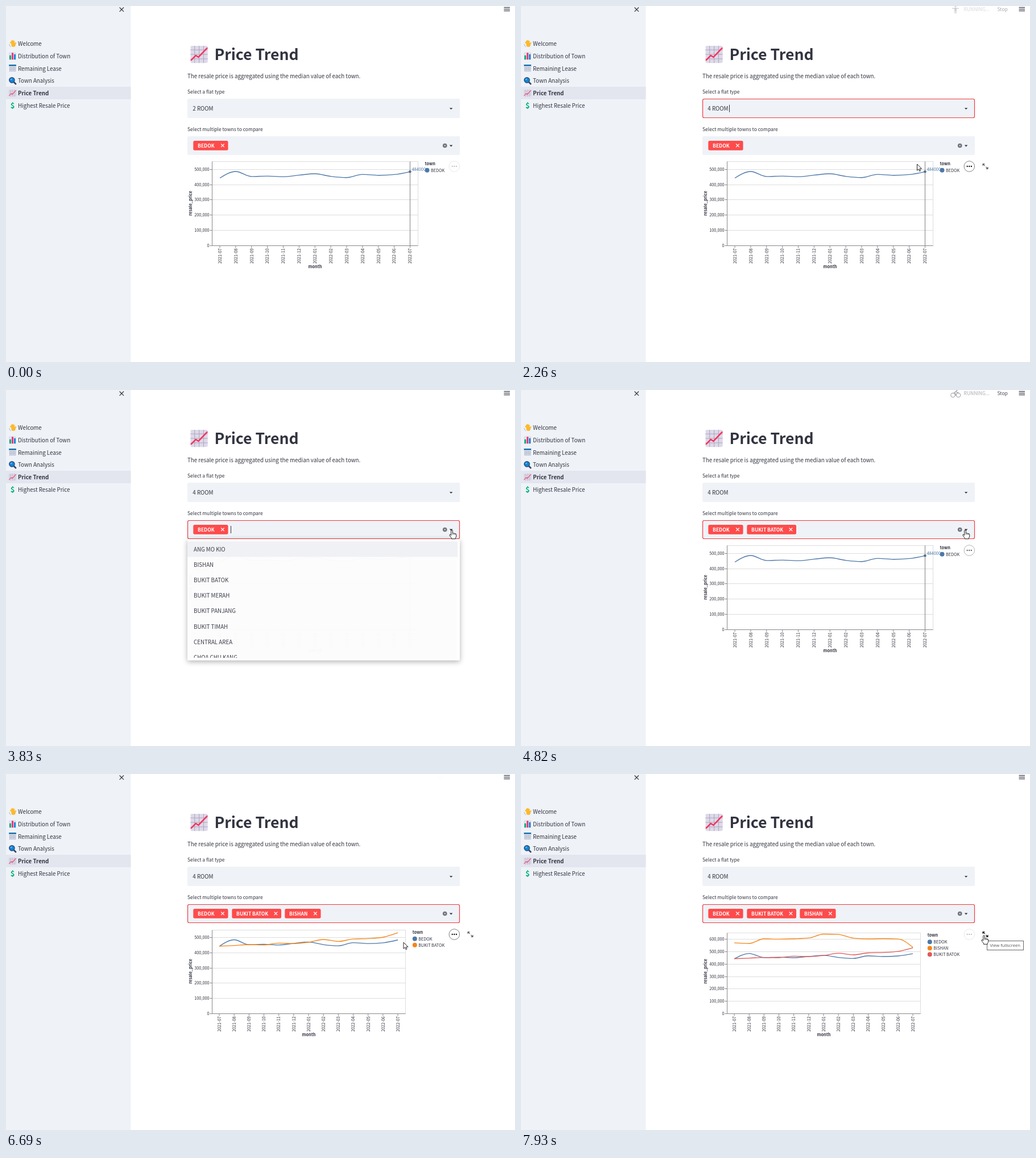
An HTML page with a canvas that plays this animation: 895x626 px, repeating every 8000 ms.

```html
<!DOCTYPE html>
<html lang="en">
<head>
<meta charset="utf-8">
<title>Price Trend</title>
<style>
html, body { margin: 0; width: 100%; height: 100%; overflow: hidden; background: #fff; }
canvas { display: block; width: 895px; height: 626px; }
</style>
</head>
<body>
<canvas id="stage"></canvas>
<script>
const W = 895, H = 626, LOOP = 8000;
const canvas = document.getElementById('stage');
const ctx = canvas.getContext('2d');
const dpr = window.devicePixelRatio || 1;
canvas.width = W * dpr;
canvas.height = H * dpr;

const SANS = '"Noto Sans CJK SC", "Noto Sans CJK JP", "Noto Sans CJK TC", "Noto Sans", sans-serif';
const INK = '#31333f', PANEL = '#eff2f7', RED = '#ff4b4b';
const BODY = 9.74, SMALL = 8.5, TINY = 7.28;

// ---------- helpers ----------
const clamp = v => Math.max(0, Math.min(1, v));
const ease = v => v * v * (3 - 2 * v);
const between = (t, a, b) => t >= a && t < b;
const fade = (t, a, b, rise, fall) => clamp((t - a) / rise) * (1 - clamp((t - b) / fall));

function text(str, x, y, size, color = INK, weight = 400, align = 'left') {
  ctx.font = `${weight} ${size}px ${SANS}`;
  ctx.fillStyle = color;
  ctx.textAlign = align;
  ctx.fillText(str, x, y);
}

function vertical(str, x, y, size, color, weight, align) {
  ctx.save();
  ctx.translate(x, y);
  ctx.rotate(-Math.PI / 2);
  text(str, 0, 0, size, color, weight, align);
  ctx.restore();
}

function rect(x, y, w, h, color, r = 0) {
  ctx.fillStyle = color;
  ctx.beginPath();
  ctx.roundRect(x, y, w, h, r);
  ctx.fill();
}

function line(pts, color, width = 1) {
  ctx.strokeStyle = color;
  ctx.lineWidth = width;
  ctx.beginPath();
  pts.forEach(([x, y]) => ctx.lineTo(x, y));
  ctx.stroke();
}

function dot(x, y, r, fill, stroke, width = 1) {
  ctx.beginPath();
  ctx.arc(x, y, r, 0, 7);
  if (fill) { ctx.fillStyle = fill; ctx.fill(); }
  if (stroke) { ctx.strokeStyle = stroke; ctx.lineWidth = width; ctx.stroke(); }
}

function cross(x, y, r, color, width) {
  line([[x - r, y - r], [x + r, y + r]], color, width);
  line([[x - r, y + r], [x + r, y - r]], color, width);
}

function at(x, y, scale, draw) {
  ctx.save();
  ctx.translate(x, y);
  ctx.scale(scale, scale);
  draw();
  ctx.restore();
}

function withAlpha(alpha, draw) {
  if (alpha <= 0) return;
  ctx.save();
  ctx.globalAlpha = alpha;
  draw();
  ctx.restore();
}

// ---------- small pictures, each in a box of about 13 px ----------
function waveIcon() {
  ctx.lineCap = 'round';
  [[3.2, 4.5], [4.8, 2.2], [7, 1.4], [9.3, 2.6]].forEach(([x, y]) =>
    line([[x, y], [8, 8.5]], '#fcb92c', 2.3));
  line([[11.8, 5.4], [10.2, 9]], '#fcb92c', 2.2);
  dot(8, 8.8, 3.7, '#fcb92c');
  line([[.8, 8], [1.6, 10.6], [3.4, 12.2]], '#8fa6b8', .8);
  ctx.lineCap = 'butt';
}

function barsIcon() {
  rect(0, 0, 13, 13, '#dfe1ec', 1.5);
  rect(1, 5.5, 3, 7.5, '#00a88a', .5);
  rect(5, 1, 3, 12, '#f4386c', .5);
  rect(9, 3.5, 3, 9.5, '#1687dc', .5);
}

function calendarIcon() {
  rect(0, 0, 13, 13, '#e4e7f2', 1.5);
  rect(0, 0, 13, 2.7, '#2277ad', 1);
  for (let i = 0; i < 12; i++) rect(1.6 + i % 4 * 2.8, 4.7 + (i >> 2) * 2.7, 1.4, 1.4, '#778299');
}

function lensIcon() {
  ctx.lineCap = 'round';
  line([[8.5, 8.5], [12, 12]], '#33486d', 2.8);
  ctx.lineCap = 'butt';
  dot(5.4, 5.4, 4.6, '#1683d5', '#24517f', 1.5);
  dot(4.2, 4, 1.3, '#62bbf2');
}

function trendIcon() {
  rect(0, 0, 13, 13, '#ded9e9', 1);
  [3.1, 6.5, 9.9].forEach(p => {
    line([[p, 0], [p, 13]], '#aaa4bb', .4);
    line([[0, p], [13, p]], '#aaa4bb', .4);
  });
  ctx.lineCap = ctx.lineJoin = 'round';
  line([[.5, 10.8], [4, 7.3], [6, 8.6], [12.5, 1.8]], '#f8315b', 1.05);
  ctx.lineCap = 'butt';
  ctx.lineJoin = 'miter';
}

function dollarIcon() { text('$', 6.5, 11.2, 13, '#00b37a', 700, 'center'); }

// ---------- static page ----------
const LINKS = [
  ['Welcome', waveIcon], ['Distribution of Town', barsIcon], ['Remaining Lease', calendarIcon],
  ['Town Analysis', lensIcon], ['Price Trend', trendIcon], ['Highest Resale Price', dollarIcon]
];

function page() {
  rect(0, 0, W, H, '#fff');
  rect(0, 0, 219.5, H, PANEL);
  rect(0, 142, 219.5, 22, '#e3e6ee');
  cross(203.3, 6.2, 3.7, INK, 1.2);
  LINKS.forEach(([name, icon], i) => {
    const y = 66 + i * 21.8;
    at(5, y - 6.5, 1, icon);
    text(name, 21, y + 4, BODY, INK, i === 4 ? 700 : 400);
  });
  [2.5, 5.5, 8.5].forEach(y => line([[875.5, y], [886, y]], INK, 1.2));
  at(324.5, 70, 2.32, trendIcon);
  text('Price Trend', 366.5, 95, 26.55, INK, 700);
  text('The resale price is aggregated using the median value of each town.', 319, 126.5, BODY);
  text('Select a flat type', 319, 153.6, SMALL);
  text('Select multiple towns to compare', 319, 219.6, SMALL);
}

function field(y, h, focused) {
  rect(319, y, 479, h, PANEL, 2.5);
  if (focused) {
    ctx.strokeStyle = '#f03a3e';
    ctx.lineWidth = 1.2;
    ctx.beginPath();
    ctx.roundRect(319.5, y + .5, 478, h - 1, 2.5);
    ctx.stroke();
  }
}

function chevron(x, y) {
  ctx.fillStyle = INK;
  ctx.beginPath();
  ctx.moveTo(x - 2.8, y - 1.3);
  ctx.lineTo(x + 2.8, y - 1.3);
  ctx.lineTo(x, y + 1.6);
  ctx.fill();
}

const caret = (x, y) => rect(x, y, 1, 13, INK);

const TAGS = [['BEDOK', 329.3, 61.2], ['BUKIT BATOK', 397.3, 86.7], ['BISHAN', 490.3, 63.2]];

function tag([name, x, w]) {
  rect(x, 236.9, w, 16.9, RED, 2.5);
  text(name, x + 7.8, 249, SMALL, '#fff', 700);
  cross(x + w - 9.6, 245.3, 2.8, '#fff', 1.2);
}

// ---------- charts ----------
const TOWNS = {
  BEDOK: [442, 485, 452, 455, 451, 461, 470, 453, 445, 466, 460, 465, 484],
  BISHAN: [571, 566, 604, 601, 604, 610, 642, 639, 609, 603, 605, 602, 535],
  'BUKIT BATOK': [443, 447, 453, 451, 463, 460, 469, 487, 474, 490, 493, 502, 531]
};
const COLORS = ['#4c78a8', '#f58518', '#e45756'];
const MONTHS = Array.from({ length: 13 }, (_, i) =>
  `${2021 + (i > 5)}-${String((i + 6) % 12 + 1).padStart(2, '0')}`);
const BASE = 421, LEFT = 362.5;
const CHARTS = [
  { towns: ['BEDOK'], right: 724.5, top: 273.5, x0: 376, step: 27.87, unit: .268, max: 5, lx: 736.5, ly: 276.5 },
  { towns: ['BEDOK', 'BUKIT BATOK'], right: 702.5, top: 274.5, x0: 375, step: 26.17, unit: .267, max: 5, lx: 714.8, ly: 277.5 },
  { towns: ['BEDOK', 'BISHAN', 'BUKIT BATOK'], right: 702.5, top: 279.5, x0: 375, step: 26.17, unit: .2173, max: 6, lx: 714.8, ly: 283 }
];

// Monotone cubic through evenly spaced points.
function curve(ys, x0, dx, color) {
  const n = ys.length;
  const s = ys.slice(1).map((y, i) => y - ys[i]);
  const m = ys.map((_, i) => {
    if (!i || i === n - 1) return 0;
    const [a, b] = [s[i - 1], s[i]];
    return (Math.sign(a) + Math.sign(b)) * Math.min(Math.abs(a), Math.abs(b), Math.abs(a + b) / 4);
  });
  m[0] = (3 * s[0] - m[1]) / 2;
  m[n - 1] = (3 * s[n - 2] - m[n - 2]) / 2;
  ctx.strokeStyle = color;
  ctx.lineWidth = 1.35;
  ctx.beginPath();
  ctx.moveTo(x0, ys[0]);
  for (let i = 1; i < n; i++) {
    const x = x0 + i * dx;
    ctx.bezierCurveTo(x - dx * 2 / 3, ys[i - 1] + m[i - 1] / 3, x - dx / 3, ys[i] - m[i] / 3, x, ys[i]);
  }
  ctx.stroke();
}

function chart(c, ruled) {
  const yOf = v => BASE - v * c.unit;
  const mid = (LEFT + c.right) / 2;
  const floor = BASE + .5;
  ctx.strokeStyle = '#ddd';
  ctx.lineWidth = 1;
  ctx.strokeRect(LEFT, c.top, c.right - LEFT, floor - c.top);
  for (let i = 0; i <= c.max; i++) {
    const y = Math.floor(yOf(i * 100) + .3) + .5;
    if (i) line([[LEFT, y], [c.right, y]], '#ddd');
    line([[LEFT - 4, y], [LEFT, y]], '#888');
    text((i * 100000).toLocaleString('en-US'), 357.5, y + 2.5, TINY, INK, 400, 'right');
  }
  line([[LEFT, c.top], [LEFT, floor], [c.right, floor]], '#888');
  MONTHS.forEach((name, i) => {
    const x = c.x0 + i * c.step;
    line([[x, floor], [x, floor + 4]], '#888');
    vertical(name, x + 2.8, 426.3, TINY, INK, 400, 'right');
  });
  text('month', mid, 461.3, TINY, INK, 700, 'center');
  vertical('resale_price', 326.5, 347, TINY, INK, 700, 'center');

  c.towns.forEach((town, i) => curve(TOWNS[town].map(yOf), c.x0, c.step, COLORS[i]));
  if (ruled) {
    const x = c.x0 + 12 * c.step;
    line([[x, c.top], [x, floor]], '#808080');
    dot(x, yOf(484), 1.9, COLORS[0], '#444', .6);
    text('484000', x + 3.3, yOf(484) - 1.3, TINY, COLORS[0]);
  }
  text('town', c.lx, c.ly + 3, TINY, INK, 700);
  c.towns.forEach((town, i) => {
    const y = c.ly + 12.2 + i * 11;
    dot(c.lx + 4, y, 4, COLORS[i]);
    text(town, c.lx + 10.5, y + 2.8, TINY);
  });
}

function chartTools(t) {
  const hover = Math.max(fade(t, 1940, 3400, 140, 250), fade(t, 4330, 4650, 150, 350), fade(t, 6400, 7600, 180, 250));
  dot(788.3, 282, 9.3, '#fff', `rgba(0,0,0,${.09 + .4 * hover})`, 1);
  [-3.6, 0, 3.6].forEach(d => dot(788.3 + d, 282, 1.15, `rgba(0,0,0,${.25 + .75 * hover})`));
  const shown = Math.max(fade(t, 1980, 3350, 110, 200), fade(t, 6380, LOOP, 150, 1));
  withAlpha(shown, () => at(816.5, 282, 1, () => {
    const color = t > 7780 ? '#111' : '#666';
    line([[-3.5, -3.5], [3.5, 3.5]], color, 1.3);
    [-1, 1].forEach(k => {
      ctx.fillStyle = color;
      ctx.beginPath();
      ctx.moveTo(5 * k, 5 * k);
      ctx.lineTo(.6 * k, 5 * k);
      ctx.lineTo(5 * k, .6 * k);
      ctx.fill();
    });
    line([[-1, -1], [1, 1]], '#fff', 2);
  }));
}

// ---------- dropdown lists ----------
const FLATS = ['2 ROOM', '3 ROOM', '4 ROOM', '5 ROOM', 'EXECUTIVE', 'MULTI-GENERATION'];
const AREAS = ['ANG MO KIO', 'BISHAN', 'BUKIT BATOK', 'BUKIT MERAH', 'BUKIT PANJANG', 'BUKIT TIMAH',
  'CENTRAL AREA', 'CHOA CHU KANG', 'CLEMENTI'];
const MENUS = [
  { items: FLATS, top: 197, h: 172.5, open: 1200, close: 1800, wide: 479 },
  { items: AREAS, top: 262, h: 213.5, open: 3725, close: 4190, wide: 475 },
  { items: AREAS.filter(a => a !== 'BUKIT BATOK'), top: 262, h: 213.5, open: 5720, close: 6430, wide: 475 }
];
const ROW = 27.2;

function menu(m, t, pos) {
  withAlpha(fade(t, m.open, m.close, 110, 100), () => {
    ctx.save();
    ctx.shadowColor = 'rgba(0,0,0,.32)';
    ctx.shadowBlur = 10 * dpr;
    ctx.shadowOffsetY = 2.5 * dpr;
    rect(319, m.top, 479, m.h, '#fff', 2);
    ctx.restore();
    const first = m.top + 4.2;
    const over = Math.floor((pos.y - first) / ROW);
    const active = over >= 0 && over < m.items.length ? over : 0;
    ctx.beginPath();
    ctx.rect(319, first, 479, m.h - 9);
    ctx.clip();
    rect(319, first + active * ROW, m.wide, ROW, '#f0f1f5');
    m.items.forEach((name, i) => text(name, 330, first + ROW * (i + .5) + 3.8, BODY));
  });
}

// ---------- status in the top corner ----------
const RUNS = [[2200, 2900], [4390, 5460], [6690, 7500]];
const GREY = '#a9aab0';
const POSES = [
  () => {
    dot(8, 1, 1.6, GREY);
    line([[2, 4.2], [14, 4.2]], GREY, 1.5);
    rect(6, 3.6, 4, 5, GREY);
    line([[6.9, 8], [6.9, 13]], GREY, 1.5);
    line([[9.1, 8], [9.1, 13]], GREY, 1.5);
  },
  () => {
    dot(10, 1, 1.6, GREY);
    line([[4, 6], [6, 3.5], [9, 4], [11, 6.5], [13, 6]], GREY, 1.4);
    line([[8.5, 4], [7, 8], [10, 10], [9, 13]], GREY, 1.8);
    line([[7, 8], [5.5, 10.5], [2, 10.5]], GREY, 1.6);
  },
  () => {
    dot(3.5, 9, 3.7, null, GREY, 1.2);
    dot(13, 9, 3.7, null, GREY, 1.2);
    dot(10.4, 0, 1.5, GREY);
    line([[8, 10], [8.5, 7], [5.8, 5], [9, 2.3], [11, 4.4], [13.3, 4.4]], GREY, 1.5);
  },
  () => {
    dot(11.5, 4.5, 1.7, GREY);
    line([[1, 8], [5, 6], [7, 3], [10, 5.5]], GREY, 1.6);
    line([[0, 10.5], [4, 9.5], [8, 10.5], [12, 9.5], [16, 10.5]], GREY, 1.3);
  }
];

function status(t) {
  RUNS.forEach(([a, b]) => withAlpha(fade(t, a, b, 130, 130), () => {
    at(756, 0, 1, POSES[Math.floor(Math.max(0, t - a) / 160) % 4]);
    text('RUNNING...', 778.5, 9.2, SMALL, GREY);
    text('Stop', 837.5, 9.2, SMALL, '#4a4c57');
  }));
}

// ---------- pointer ----------
const PATH = [
  [70, 866, 602], [140, 866, 602], [520, 748, 154], [600, 748, 154], [900, 778, 175.5],
  [1330, 778, 175.5], [1700, 750, 262], [1820, 750, 262], [2090, 696.5, 278],
  [2810, 696.5, 278], [3590, 784, 246], [3880, 784, 246], [4130, 772, 328], [4220, 772, 328],
  [4760, 781, 246], [5850, 781, 246], [6280, 699, 296], [7460, 699, 296], [7800, 814, 283.5]
];

function pointerAt(t) {
  const i = PATH.findIndex(p => p[0] > t);
  if (i === 0) return { x: 866, y: 700 };
  if (i < 0) return { x: 814, y: 283.5 };
  const [a, b] = [PATH[i - 1], PATH[i]];
  const k = ease((t - a[0]) / (b[0] - a[0]));
  return { x: a[1] + (b[1] - a[1]) * k, y: a[2] + (b[2] - a[2]) * k };
}

const ARROW = new Path2D('M0 0V11.2L2.6 8.8L4.3 12.6L6 11.8L4.4 8.1H8Z');
const HAND = new Path2D('M-1.3 1Q0 -.8 1.3 1V6Q2.5 5 3.6 6.3Q4.8 5.5 5.7 6.8Q7.6 6.2 7.7 8.5V11Q7.5 13 6.3 14.2V15.8H-.5V14.3Q-2.2 12.5 -4 9.6Q-4.6 8 -2.8 8L-1.3 9.6Z');

function pointer(t, { x, y }) {
  if (t < 70) return;
  const inField = x < 798 && (between(y, 163, 197) || between(y, 229, 262));
  const inMenu = MENUS.some(m => between(t, m.open, m.close) && y > m.top);
  const shape = inField || inMenu || x > 806 && between(y, 272, 292) ? HAND : ARROW;
  at(x, y, 1, () => {
    ctx.lineJoin = 'round';
    ctx.fillStyle = '#fff';
    ctx.fill(shape);
    ctx.strokeStyle = '#222';
    ctx.lineWidth = 1;
    ctx.stroke(shape);
    if (shape === HAND) [1.3, 3.6, 5.7].forEach(d => line([[d, 6], [d, 8.6]], '#222', .7));
    ctx.lineJoin = 'miter';
  });
}

function tooltip() {
  rect(819, 293.5, 65, 16, '#fff');
  ctx.strokeStyle = '#666';
  ctx.lineWidth = 1;
  ctx.strokeRect(819.5, 293.5, 64, 16);
  ctx.font = '7.7px "Open Sans", "Noto Sans", sans-serif';
  ctx.fillStyle = '#555';
  ctx.textAlign = 'left';
  ctx.fillText('View fullscreen', 824.5, 304.4);
}

// ---------- scene ----------
function draw(t) {
  ctx.setTransform(dpr, 0, 0, dpr, 0, 0);
  const pos = pointerAt(t);
  page();
  status(t);

  field(163, 34, between(t, 1200, 3600));
  text(t < 1800 ? '2 ROOM' : '4 ROOM', 328.3, 184, BODY);
  if (between(t, 1170, 3600) && (t - 1170) % 1060 < 530) caret(366, 173.7);
  chevron(782.6, 180.5);

  field(229, 33, t >= 3660);
  const count = t < 4190 ? 1 : t < 6430 ? 2 : 3;
  TAGS.slice(0, count).forEach(tag);
  if (between(t, 3660, 4190)) caret(395, 239);
  if (between(t, 5690, 6430)) caret(488, 239);
  dot(771.7, 245.5, 3.8, '#6c6e76');
  cross(771.7, 245.5, 1.4, '#fff', .9);
  chevron(782.6, 245.8);

  const stage = t < 5440 ? 0 : t < 7540 ? 1 : 2;
  chart(CHARTS[stage], stage === 0);
  chartTools(t);
  MENUS.forEach(m => menu(m, t, pos));
  if (t >= 7930) tooltip();
  pointer(t, pos);
}

const start = performance.now();
function tick() {
  draw((performance.now() - start) % LOOP);
  requestAnimationFrame(tick);
}
tick();
</script>
</body>
</html>
```
